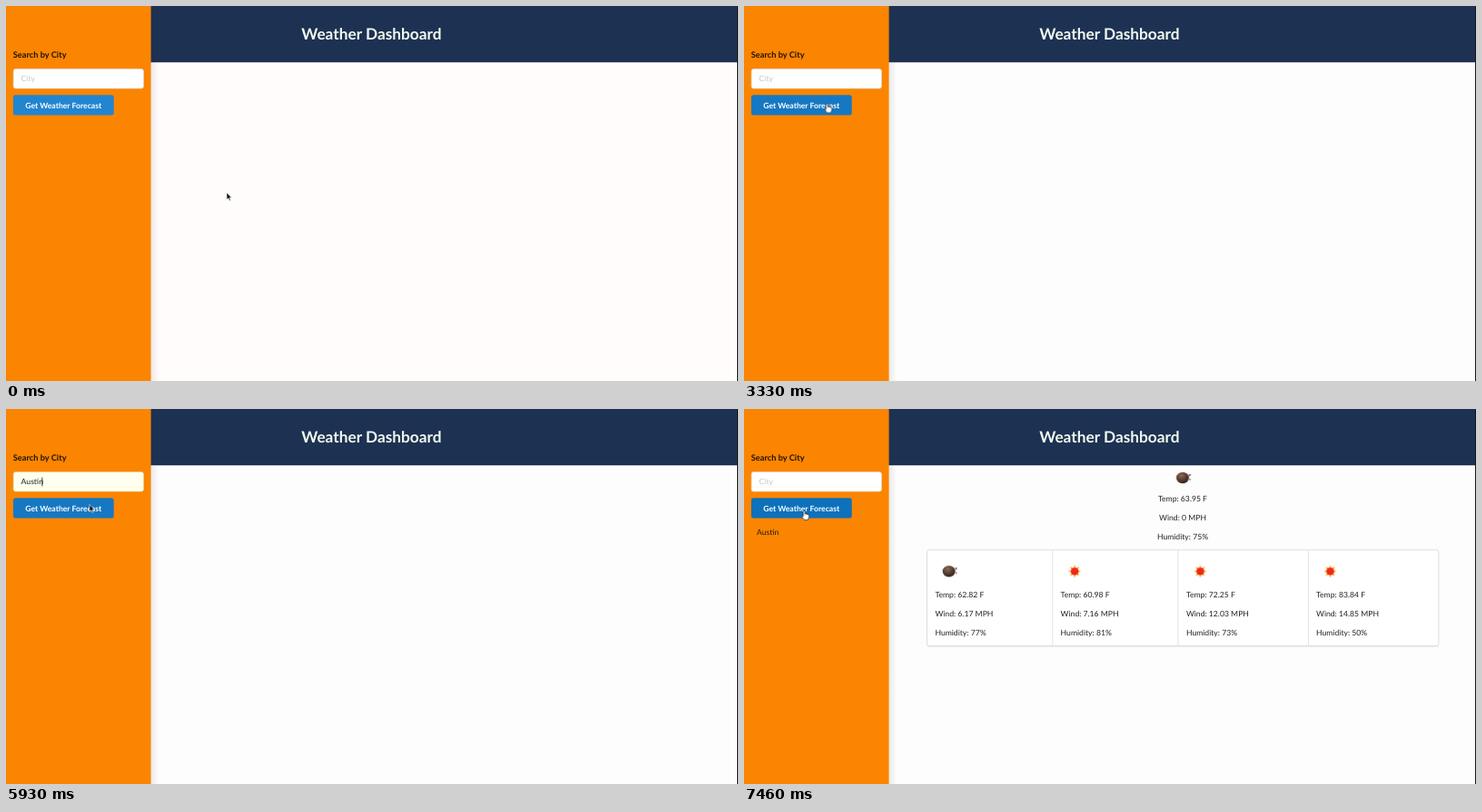
An HTML page that plays this animation: 806 px wide and 414 px high, repeating every 8000 ms.

```html
<!DOCTYPE html>
<html lang="en">
<head>
<meta charset="utf-8">
<title>Weather Dashboard</title>
<style>
  html, body { margin: 0; width: 100%; height: 100%; overflow: hidden; background: #fdfdfd; }
  svg { display: block; }
  text { font: 400 8.65px Lato, sans-serif; fill: #212121; text-rendering: geometricPrecision; }
  .bold { font-weight: 700; }
  .title { font-size: 17.3px; fill: #f1faee; }
  .label { font-size: 9.26px; fill: #1f1202; }
  .list { fill: #2b1a05; }
  .mid { text-anchor: middle; }

  /* Every track shares the 8 s clock; "step" tracks change hard. */
  .step, .run { animation: 8s linear infinite; }
  .step { animation-timing-function: step-end; }

  #page { animation-name: page; }
  @keyframes page { 0%, 3.25% { fill: #fffcfb } 13.25%, 100% { fill: #fdfdfd } }

  #button { fill: #2185d0; animation-name: button; }
  @keyframes button {
    0%, 14.1% { fill: #2185d0 }
    15.4%, 48% { fill: #1678c2 }
    49.4%, 72.6% { fill: #2185d0 }
    73.8%, 83% { fill: #1678c2 }
    84.2%, 100% { fill: #0d71bb }
  }

  #field { fill: #fff; stroke: #dedede; animation-name: field; }
  @keyframes field {
    0% { fill: #fff; stroke: #dedede }
    50% { fill: #fff; stroke: #a9cbe2 }
    71.625% { fill: #fffff0; stroke: #e5dfa1 }
    83.25% { fill: #fff; stroke: #dedede }
  }

  #hint { animation-name: hint; }
  @keyframes hint {
    0% { fill: #c7c7c7; opacity: 1 }
    50% { fill: #858585; opacity: 1 }
    65.75% { fill: #858585; opacity: 0 }
    83.25% { fill: #c7c7c7; opacity: 1 }
  }

  /* Typed letters are uncovered as the caret advances. */
  #typed { animation-name: typed; }
  @keyframes typed {
    0% { width: 0 }
    65.75% { width: 6px }
    67.5% { width: 10.8px }
    69.125% { width: 14.7px }
    71.625% { width: 30px }
    83.25% { width: 0 }
  }
  #caret { animation-name: caret; }
  @keyframes caret {
    0% { opacity: 0; transform: none }
    59.125% { opacity: 1; transform: none }
    65.75% { opacity: 1; transform: translateX(5.9px) }
    67.5% { opacity: 1; transform: translateX(10.7px) }
    69.125% { opacity: 1; transform: translateX(14.6px) }
    71.625% { opacity: 1; transform: translateX(23px) }
    83.25% { opacity: 0; transform: none }
  }

  #history { animation-name: history; }
  @keyframes history { 0% { opacity: 0 } 83.25% { opacity: 1 } }
  #empty { animation-name: empty; }
  @keyframes empty { 0% { opacity: 0 } 84.125% { opacity: 1 } 90% { opacity: 0 } }
  #results { animation-name: results; }
  @keyframes results { 0% { opacity: 0 } 90% { opacity: 1 } }
  .icon { animation-name: icon; }
  @keyframes icon { 0% { opacity: 0 } 91.625% { opacity: 1 } }

  #pointer { animation-name: move; animation-timing-function: ease-in-out; }
  @keyframes move {
    0%, 3.25% { transform: translate(243px, 206px) }
    13.25% { transform: translate(104px, 122px) }
    15.75%, 31.6% { transform: translate(97.5px, 118px) }
    38.25%, 40% { transform: translate(94px, 115px) }
    41.625% { transform: translate(91.5px, 107.5px) }
    45.75%, 47.5% { transform: translate(88px, 107px) }
    50%, 69.125% { transform: translate(81.2px, 85px) }
    74.125%, 79.125% { transform: translate(92px, 105.5px) }
    85%, 100% { transform: translate(66.3px, 112px) }
  }
  #arrow { animation-name: arrow; }
  @keyframes arrow {
    0% { opacity: 1 } 14.125% { opacity: 0 } 69.125% { opacity: 1 } 75.75% { opacity: 0 }
  }
  #hand { animation-name: hand; }
  @keyframes hand {
    0% { opacity: 0 } 14.125% { opacity: 1 } 48.25% { opacity: 0 } 75.75% { opacity: 1 }
  }
  #beam { animation-name: beam; }
  @keyframes beam { 0% { opacity: 0 } 48.25% { opacity: 1 } 65.75% { opacity: 0 } }
</style>
</head>
<body>
<svg width="806" height="414" viewBox="0 0 806 414">
  <defs>
    <linearGradient id="shade">
      <stop offset="0" stop-color="#222426" stop-opacity=".09"/>
      <stop offset="1" stop-color="#222426" stop-opacity="0"/>
    </linearGradient>
    <radialGradient id="ball" cx=".4" cy=".3" r=".75">
      <stop offset="0" stop-color="#8a6b57"/>
      <stop offset=".55" stop-color="#553b2e"/>
      <stop offset="1" stop-color="#33221b"/>
    </radialGradient>
    <clipPath id="reveal"><rect id="typed" class="step" x="16" y="70" width="0" height="20"/></clipPath>
    <g id="cloud">
      <ellipse cx="-.3" rx="7" ry="6.2" fill="url(#ball)"/>
      <circle cx="7.6" cy="-3.2" r="1.1" fill="#6d4a38"/>
      <circle cx="7.8" cy="1.8" r=".9" fill="#8d6a55"/>
    </g>
    <g id="sun">
      <path id="rays" fill="#f3a72e"/>
      <circle r="4.1" fill="#f0271a"/>
    </g>
  </defs>

  <rect id="page" class="run" width="806" height="414" fill="#fdfdfd"/>
  <rect x="159.5" y="62" width="9" height="352" fill="url(#shade)"/>
  <rect x="159" width="647" height="62.2" fill="#1d3153"/>
  <rect width="159.6" height="414" fill="#fb8500"/>
  <rect x="805" width="1" height="414" fill="#161616"/>

  <text class="bold title mid" x="402.4" y="37.2">Weather Dashboard</text>
  <text class="bold label" x="7.8" y="57">Search by City</text>

  <rect id="field" class="step" x="8.2" y="69.6" width="143.2" height="21.4" rx="2.3" stroke-width=".7"/>
  <text id="hint" class="step" x="16.6" y="83.2">City</text>
  <text x="16.6" y="83.2" clip-path="url(#reveal)">Austin</text>
  <rect id="caret" class="step" x="16.5" y="75.5" width=".8" height="9.8" fill="#111"/>

  <rect id="button" class="run" x="8" y="98.3" width="110.7" height="22.2" rx="2.5"/>
  <text class="bold mid" x="63.2" y="112.6" style="fill:#fff">Get Weather Forecast</text>
  <text id="history" class="list step" x="14" y="139.3">Austin</text>

  <g id="empty" class="step"></g>
  <g id="results" class="step"></g>

  <g id="pointer" class="run">
    <path id="arrow" class="step" d="M0 0V7.8L1.8 6.2 3 9 4.3 8.4 3.1 5.7H5.5Z" fill="#111" stroke="#fff" stroke-width=".6"/>
    <path id="hand" class="step" d="M-1 1Q0-.6 1 1V4L2 3.8 3 4.2 4 4.3Q5.2 4.5 5.2 5.6V7.6L4.2 10.4H-.2L-2.6 6.8Q-2.8 5.4-1 6.4Z" fill="#fff" stroke="#222" stroke-width=".7" stroke-linejoin="round"/>
    <path id="beam" class="step" d="M-1.8-4.3Q0-4.3 0-3.3Q0-4.3 1.8-4.3M0-3.3V4M-1.8 5Q0 5 0 4Q0 5 1.8 5M-1 2H1" fill="none" stroke="#444" stroke-width=".8"/>
  </g>
</svg>
<script>
  const get = id => document.getElementById(id);

  const panel = (top, height, dividers) =>
    `<rect x="201.5" y="${top + 1}" width="563.4" height="${height}" rx="2.3" fill="#d9d9d9" opacity=".75"/>
     <rect x="201.5" y="${top}" width="563.4" height="${height}" rx="2.3" fill="#fff" stroke="#d6d6d7" stroke-width=".8"/>
     <path d="${dividers.map(x => `M${x} ${top}v${height}`).join('')}" stroke="#dedede" stroke-width=".8"/>`;

  const icon = (kind, x, y) => `<use class="icon step" href="#${kind}" x="${x}" y="${y}"/>`;

  const report = (x, y, [temp, wind, humidity], cls = '') =>
    [`Temp: ${temp} F`, `Wind: ${wind} MPH`, `Humidity: ${humidity}%`]
      .map((line, i) => `<text class="${cls}" x="${x}" y="${y + 21 * i}">${line}</text>`).join('');

  const days = [
    [210.4, 'cloud', '62.82', '6.17', 77],
    [348.6, 'sun', '60.98', '7.16', 81],
    [486.9, 'sun', '72.25', '12.03', 73],
    [630, 'sun', '83.84', '14.85', 50]
  ];

  // Eight pointed rays: radius alternates around the circle.
  get('rays').setAttribute('d', 'M' + Array.from({ length: 16 }, (_, i) => {
    const r = i % 2 ? 4 : 7, a = i * Math.PI / 8;
    return `${(r * Math.cos(a)).toFixed(2)} ${(r * Math.sin(a)).toFixed(2)}`;
  }).join('L') + 'Z');

  get('empty').innerHTML = panel(71, 17.8, [342.4, 483.2, 624]);
  get('results').innerHTML =
    icon('cloud', 483.3, 76) +
    report(483, 102, ['63.95', '0', 75], 'mid') +
    panel(155.6, 106, [339.8, 478, 621.4]) +
    days.map(([x, kind, ...data]) => icon(kind, x + 15.5, 179.2) + report(x, 207.6, data)).join('');
</script>
</body>
</html>
```
